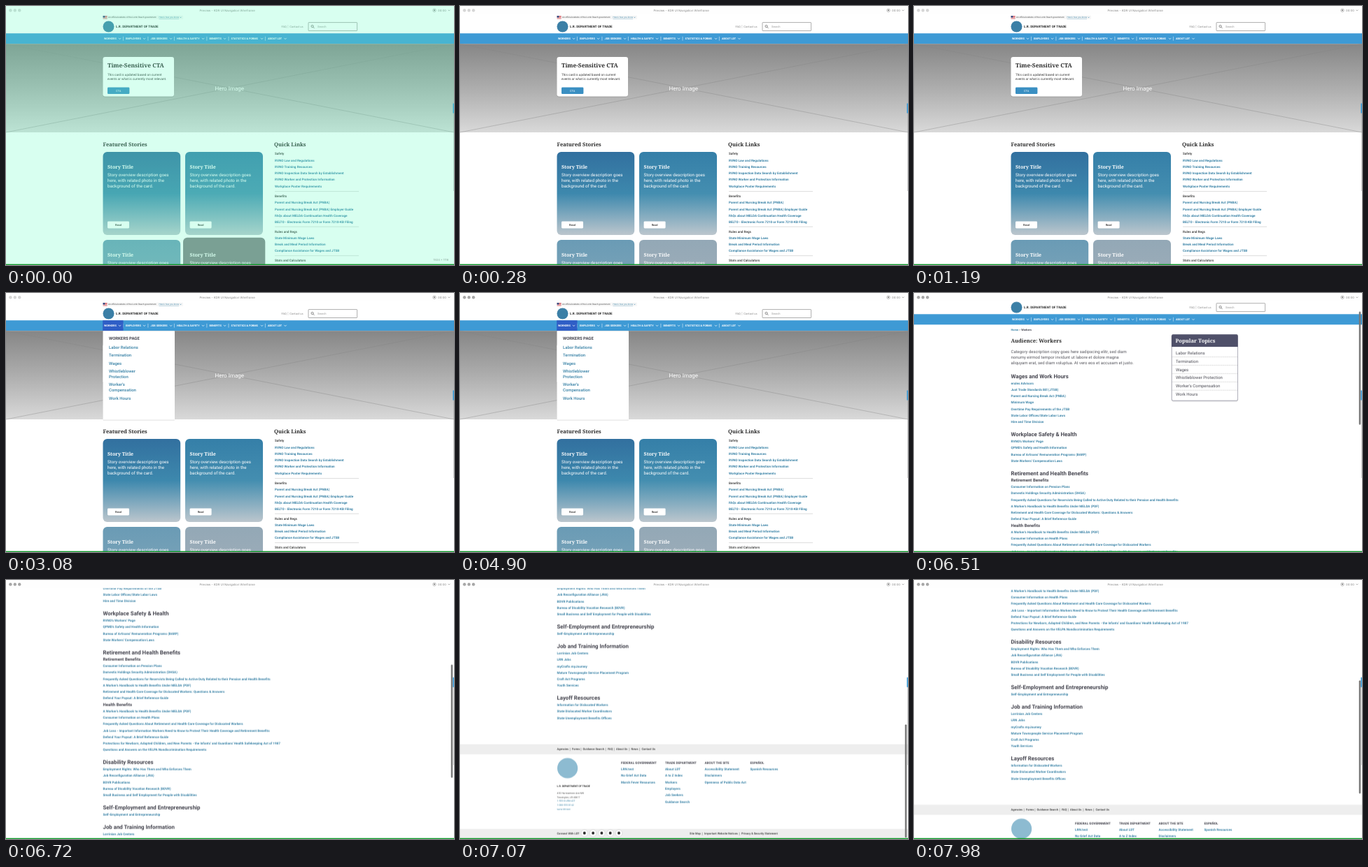
These frames come from a looping animation (640 by 371 pixels, 8000 ms). An HTML page:

```html
<!DOCTYPE html>
<html lang="en">
<head>
<meta charset="utf-8">
<title>Navigation wireframe</title>
<style>
html, body { margin: 0; width: 100%; height: 100%; overflow: hidden; background: #fff; }
svg { display: block; width: 100vw; height: 100vh; }
text { font-family: Roboto, "Liberation Sans", sans-serif; text-rendering: geometricPrecision; white-space: pre; }
.serif { font-family: "Noto Serif", "Liberation Serif", serif; font-weight: 700; }
.ui { font-family: Inter, "Liberation Sans", sans-serif; }
.menu, .page, .scroll, .thumb, .fade, .focus { animation: 8s linear infinite; }
.menu { animation-name: menu; animation-timing-function: step-end; }
.page { animation-name: page; animation-timing-function: step-end; }
.focus { animation-name: focus; animation-timing-function: step-end; }
.scroll { animation-name: scroll; }
.thumb { animation-name: thumb; }
.fade { animation-name: fade; }
@keyframes menu { 0% { opacity: 0 } 32.375% { opacity: 1 } 64.75%, 100% { opacity: 0 } }
@keyframes page { 0% { opacity: 0 } 64.75%, 100% { opacity: 1 } }
@keyframes focus { 0% { fill: #d6d6d6 } 45.5%, 100% { fill: #a8a8a8 } }
@keyframes fade { 0%, .86% { opacity: 1 } 3.5%, 100% { opacity: 0 } }
@keyframes scroll {
  0% { transform: translateY(0) }
  80.59% { transform: translateY(0); animation-timing-function: cubic-bezier(.333, 0, .667, .333) }
  84.48% { transform: translateY(-211.25px); animation-timing-function: cubic-bezier(.333, .667, .667, 1) }
  88.375% { transform: translateY(-422.5px) }
  96.975% { transform: translateY(-422.5px); animation-timing-function: cubic-bezier(.333, 0, .667, .333) }
  100% { transform: translateY(-320.3px) }
}
@keyframes thumb {
  0%, 79.87% { transform: translateY(12px); opacity: 0 }
  79.88% { transform: translateY(12px); opacity: 1; animation-timing-function: cubic-bezier(.333, 0, .667, .333) }
  83.77% { transform: translateY(109.5px); animation-timing-function: cubic-bezier(.333, .667, .667, 1) }
  87.66% { transform: translateY(207px) }
  96.26% { transform: translateY(207px); animation-timing-function: cubic-bezier(.333, 0, .667, .333) }
  100% { transform: translateY(135px); opacity: 1 }
}
</style>
</head>
<body>
<svg id="stage" viewBox="0 0 640 371" preserveAspectRatio="none"></svg>
<script>
const LINK = '#3982a6', DARK = '#333', HEAD = '#45454f', NAV = '#3e9ad5';

const esc = s => s.replace(/&/g, '&amp;').replace(/</g, '&lt;').replace(/>/g, '&gt;');
// y is the optical middle of the line
const text = (x, y, s, size, fill = DARK, weight = 400, attr = '') =>
  `<text x="${x}" y="${(y + size * .36).toFixed(2)}" font-size="${size}" fill="${fill}" font-weight="${weight}" ${attr}>${esc(s)}</text>`;
const serif = (x, y, s, size, fill = '#2b2b2b') => text(x, y, s, size, fill, 700, 'class="serif"');
const mid = 'text-anchor="middle"';
const rect = (x, y, w, h, fill, r = 0, attr = '') =>
  `<rect x="${x}" y="${y}" width="${w}" height="${h}" rx="${r}" fill="${fill}" ${attr}/>`;
const circle = (x, y, r, fill, attr = '') => `<circle cx="${x}" cy="${y}" r="${r}" fill="${fill}" ${attr}/>`;
const line = (x1, y1, x2, y2, stroke, w = .5, attr = '') =>
  `<path d="M${x1} ${y1}L${x2} ${y2}" stroke="${stroke}" stroke-width="${w}" fill="none" ${attr}/>`;
const chevron = (x, y, stroke, r = 1.7) =>
  `<path d="M${x - r} ${y - r / 2}l${r} ${r}l${r} ${-r}" stroke="${stroke}" stroke-width=".7" fill="none"/>`;
const rows = (x, list, draw) => list.map(([y, s]) => draw(x, y, s)).join('');
const link = (x, y, s) => text(x, y, s, 4.64, LINK, 700);
const gradient = (id, ...stops) =>
  `<linearGradient id="${id}" x2="0" y2="1">${stops.map((c, i) =>
    `<stop offset="${i / (stops.length - 1)}" stop-color="${c}"/>`).join('')}</linearGradient>`;

const defs = `<defs>
  ${gradient('hero', '#868686', '#adadad', '#d9d9d9')}
  ${gradient('card1', '#32709f', '#3d88ad', '#bcc6cd')}
  ${gradient('card2', '#357fa8', '#448eb0', '#bcc6cd')}
  ${gradient('card3', '#6a9bb5', '#7aa3b8', '#b4c4cc')}
  ${gradient('card4', '#93a8b6', '#9dadb9', '#b4c4cc')}
  <filter id="shadow" x="-10%" y="-10%" width="120%" height="125%">
    <feDropShadow dx="0" dy=".6" stdDeviation=".7" flood-opacity=".25"/></filter>
</defs>`;

function flag(x, y) {
  let s = rect(x, y, 6, 4.4, '#fff');
  for (let i = 0; i < 4; i++) s += rect(x, y + i * 1.2, 6, .7, '#d0454c');
  return s + rect(x, y, 2.7, 2.4, '#2b4c86');
}

function header() {
  const items = [[140, 'WORKERS', 162.6], [171, 'EMPLOYERS', 197.6], [206.5, 'JOB SEEKERS', 235.6],
    [244, 'HEALTH & SAFETY', 281.6], [290.5, 'BENEFITS', 312.6], [321.6, 'STATISTICS & FORMS', 365.6], [374, 'ABOUT LDT', 399]];
  return rect(138, 13.5, 115, 5.6, '#f7f7f7') + flag(138.6, 14.1) +
    text(146, 16.2, 'An official website of the Lorrin Reach government', 3.07, '#444') +
    text(218.5, 16.2, "Here's how you know", 3.07, LINK, 400, 'text-decoration="underline"') + chevron(249.5, 16.2, LINK, 1) +
    circle(146.5, 29.5, 8, '#3b7fa6') +
    text(157, 29.4, 'L.R. DEPARTMENT OF TRADE', 4.58, '#2b2b2b', 700) +
    text(393.5, 29.4, 'FAQ', 4.05, '#888') + line(402.8, 27, 402.8, 31.8, '#aaa', .4) +
    text(405.2, 29.4, 'Contact us', 4.05, '#888') +
    rect(432, 23.6, 69.6, 11.9, '#fff', .6, 'stroke="#777" stroke-width=".6"') +
    circle(437.6, 29, 1.6, 'none', 'stroke="#444" stroke-width=".6"') + line(438.8, 30.2, 440.4, 31.8, '#444', .7) +
    text(445, 29.5, 'Search', 4.1, '#999') +
    rect(0, 39.2, 640, 15, NAV) +
    items.map(([x, s, cx], i) => text(x, 46.7, s, 3.84, '#fff', 700) + chevron(cx, 46.7, '#fff') +
      (i ? line(x - 3.6, 43.8, x - 3.6, 49.6, '#fff', .5) : '')).join('');
}

function storyText(x, y) {
  const body = ['Story overview description goes', 'here, with related photo in the', 'background of the card.'];
  return serif(x, y, 'Story Title', 7, '#fff') +
    body.map((s, i) => text(x, y + 11.6 + i * 8, s, 6.2, '#fff')).join('');
}
const readButton = x => rect(x, 308.4, 31, 10, '#fff', 1.3) + text(x + 15.5, 313.5, 'Read', 3.95, DARK, 500, mid);

function quickLinks() {
  const groups = [
    [211.6, 'Safety', 'RVNO Law and Regulations', 'RVNO Training Resources', 'RVNO Inspection Data Search by Establishment',
      'RVNO Worker and Protection Information', 'Workplace Poster Requirements'],
    [272.3, 'Benefits', 'Parent and Nursing Break Act (PNBA)', 'Parent and Nursing Break Act (PNBA) Employer Guide',
      'FAQs about MELDA Continuation Health Coverage', 'BELTO - Electronic Form 7210 or Form 7210-KB Filing'],
    [322.9, 'Rules and Regs', 'State Minimum Wage Laws', 'Break and Meal Period Information', 'Compliance Assistance for Wages and JTSB'],
    [364.4, 'Stats and Calculators']];
  return serif(383, 198, 'Quick Links', 7.55) + groups.map(([y, title, ...links], i) =>
    (i ? line(384, y - 6.7, 504, y - 6.7, '#aaa', .4) : '') + text(384, y, title, 4.65, DARK, 500) +
    links.map((s, n) => link(384, y + 9.28 * (n + 1), s)).join('')).join('');
}

function home() {
  return header() + rect(0, 54.2, 640, 126.8, 'url(#hero)') +
    line(0, 54.2, 640, 181, '#838383', .4) + line(0, 181, 640, 54.2, '#838383', .4) +
    text(319.3, 117.6, 'Hero Image', 8.05, '#fff', 400, mid) +
    rect(138.5, 73, 101.5, 56.5, '#fff', 3.2, 'filter="url(#shadow)"') +
    serif(145, 85, 'Time-Sensitive CTA', 8.3) +
    text(145, 98, 'This card is updated based on current', 4.63) +
    text(145, 104.2, 'events or what is currently most relevant.', 4.63) +
    rect(145, 116.4, 31.4, 9.7, '#3a8fc2', 1.3) + text(160.7, 121.3, 'CTA', 3.95, '#fff', 400, mid) +
    serif(138.5, 198, 'Featured Stories', 7.57) +
    rect(138.5, 209, 110.7, 119, 'url(#card1)', 6) + rect(256, 209, 111, 119, 'url(#card2)', 6) +
    rect(138.5, 335, 110.7, 119, 'url(#card3)', 6) + rect(256, 335, 111, 119, 'url(#card4)', 6) +
    `<g class="fade">${rect(253, 331.8, 117.3, 125, '#818084', 6)}</g>` +
    storyText(145, 230) + storyText(262.6, 230) + storyText(145, 356) + storyText(262.6, 356) +
    readButton(145) + readButton(262.6) + quickLinks();
}

function menu() {
  const items = [[78, 'Labor Relations'], [89.2, 'Termination'], [100.6, 'Wages'], [112, 'Whistleblower'], [120, 'Protection'],
    [131.2, "Worker's"], [139.2, 'Compensation'], [150.5, 'Work Hours']];
  return rect(138.2, 39.2, 29.3, 15, '#2f5ec6') + text(140, 46.7, 'WORKERS', 3.84, '#fff', 700) + chevron(162.6, 46.7, '#fff') +
    rect(138.5, 54.2, 102.5, 127.2, '#fff', .5, 'filter="url(#shadow)"') +
    text(147, 65, 'WORKERS PAGE', 5.95, HEAD, 700) + rows(147, items, (x, y, s) => text(x, y, s, 5.97, LINK, 500));
}

// A leading "*" marks a bold subheading.
const sections = [
  ['Wages and Work Hours', 'erules Advisors', 'Just Trade Standards Bill (JTSB)', 'Parent and Nursing Break Act (PNBA)', 'Minimum Wage',
    'Overtime Pay Requirements of the JTSB', 'State Labor Offices/State Labor Laws', 'Hire and Time Division'],
  ['Workplace Safety & Health', "RVNO's Workers' Page", "QPMD's Safety and Health Information",
    "Bureau of Artisans' Remuneration Programs (BARP)", "State Workers' Compensation Laws"],
  ['Retirement and Health Benefits', '*Retirement Benefits', 'Consumer Information on Pension Plans',
    'Domestic Holdings Security Administration (DHSA)',
    'Frequently Asked Questions for Reservists Being Called to Active Duty Related to their Pension and Health Benefits',
    "A Worker's Handbook to Health Benefits Under MELDA (PDF)",
    'Retirement and Health Care Coverage for Dislocated Workers: Questions & Answers',
    'Defend Your Payout: A Brief Reference Guide', '*Health Benefits',
    "A Worker's Handbook to Health Benefits Under MELDA (PDF)", 'Consumer Information on Health Plans',
    'Frequently Asked Questions About Retirement and Health Care Coverage for Dislocated Workers',
    'Job Loss - Important Information Workers Need to Know to Protect Their Health Coverage and Retirement Benefits',
    'Defend Your Payout: A Brief Reference Guide',
    "Protections for Newborn, Adopted Children, and New Parents - the Infants' and Guardians' Health Safekeeping Act of 1987",
    'Questions and Answers on the VELPA Nondiscrimination Requirements'],
  ['Disability Resources', 'Employment Rights: Who Has Them and Who Enforces Them', 'Job Reconfiguration Alliance (JRA)',
    'BDVR Publications', 'Bureau of Disability Vocation Research (BDVR)',
    'Small Business and Self Employment for People with Disabilities'],
  ['Self-Employment and Entrepreneurship', 'Self-Employment and Entrepreneurship'],
  ['Job and Training Information', 'Lorrinian Job Centers', 'LRN Jobs', 'myCrafts myJourney',
    'Mature Townspeople Service Placement Program', 'Craft Act Programs', 'Youth Services'],
  ['Layoff Resources', 'Information for Dislocated Workers', 'State Dislocated Worker Coordinators', 'State Unemployment Benefits Offices']];

function sectionList() {
  let y = 119.3, out = '';
  for (const [title, ...links] of sections) {
    out += text(138.5, y, title, 7.87, HEAD, 700);
    y += 10.2;
    for (const s of links) {
      out += s[0] === '*' ? text(138.5, y, s.slice(1), 6, HEAD, 700) : link(138.5, y, s);
      y += 9.26;
    }
    y += 8.4;
  }
  return out;
}

function topics() {
  const names = ['Labor Relations', 'Termination', 'Wages', 'Whistleblower Protection', "Worker's Compensation", 'Work Hours'];
  return rect(368.2, 60, 94.4, 94.6, '#fff', 2, 'filter="url(#shadow)" stroke="#77778c" stroke-width=".6"') +
    `<path d="M368 77.4V62q0-2.3 2.3-2.3h90.1q2.3 0 2.3 2.3v15.4z" fill="#4f5069"/>` +
    serif(373.5, 68.6, 'Popular Topics', 7.55, '#fff') +
    names.map((s, i) => text(374, 86 + i * 11.94, s, 6, '#4c4c55') +
      (i ? line(368.5, 80 + i * 11.94, 462.3, 80 + i * 11.94, '#999', .4, 'stroke-dasharray="1 .6"') : '')).join('');
}

// y = 0 here is the footer's own top edge
function footer() {
  const bar = (y, list) => list.map(([x, s], i) => text(x, y, s, 4, DARK, 500) +
    (i ? line(x - 2.8, y - 2, x - 2.8, y + 2.2, '#555', .4) : '')).join('');
  const columns = [
    [230, 'FEDERAL GOVERNMENT', 'LRN.test', 'No Grief Act Data', 'Marsh Fever Resources'],
    [293, 'TRADE DEPARTMENT', 'About LDT', 'A to Z Index', 'Workers', 'Employers', 'Job Seekers', 'Guidance Search'],
    [349.5, 'ABOUT THE SITE', 'Accessibility Statement', 'Disclaimers', 'Openness of Public Data Act'],
    [414.5, 'ESPAÑOL', 'Spanish Resources']];
  const address = ['410 Harrowmere Ave NW', 'Tessington, LR 40417', '1-555-0-LRN-LDT', '1-000-555-0142', 'www.ldt.test'];
  return rect(0, 0, 640, 14.5, '#eeeeee') +
    bar(7.3, [[138.5, 'Agencies'], [160, 'Forms'], [175.6, 'Guidance Search'], [211, 'FAQ'], [223, 'About Us'], [244.6, 'News'], [259.4, 'Contact Us']]) +
    circle(153.6, 34.3, 14.6, '#8dbbd1') + text(138.5, 60.3, 'L.R. DEPARTMENT OF TRADE', 3.57, '#2b2b2b', 700) +
    address.map((s, i) => text(138.5, 70.2 + i * 5.67, s, 3.45, i > 1 ? LINK : '#444')).join('') +
    columns.map(([x, title, ...links]) => text(x, 26.4, title, 4.58, HEAD, 700) +
      links.map((s, i) => link(x, 35.7 + i * 9.3, s)).join('')).join('') +
    rect(0, 121.3, 640, 16, '#eeeeee') + text(138.5, 128.3, 'Connect With LDT', 4, DARK, 500) +
    [177.8, 190.1, 202.4, 214.7, 227].map(x => circle(x, 127.4, 4.9, '#fff', 'stroke="#bbb" stroke-width=".4"') + circle(x, 127.4, 2, '#222')).join('') +
    bar(128.3, [[328, 'Site Map'], [349, 'Important Website Notices'], [402, 'Privacy & Security Statement']]);
}

function workersPage() {
  const intro = [[84.6, 'Category description copy goes here sadipscing elitr, sed diam'],
    [92.6, 'nonumy eirmod tempor invidunt ut labore et dolore magna'],
    [100.6, 'aliquyam erat, sed diam voluptua. At vero eos et accusam et justo.']];
  return header() + `<g transform="translate(0 8.5)">` +
    text(138.5, 53, 'Home', 4, LINK, 700) + text(150, 53, '>', 4, '#666') + text(153.2, 53, 'Workers', 4, HEAD, 700) +
    serif(138.5, 68.6, 'Audience: Workers', 7.5) + rows(138.5, intro, (x, y, s) => text(x, y, s, 5.97, '#55555c')) +
    topics() + sectionList() + `<g transform="translate(0 649.2)">${footer()}</g></g>`;
}

function titleBar() {
  const dots = [6.4, 12.8, 19.2].map(x => circle(x, 6.2, 2.2, 'inherit')).join('');
  return rect(0, 0, 640, 11.6, '#fefefe') + `<g class="focus">${dots}</g>` +
    text(316, 6.2, 'Preview - KDR UI Navigation Wireframe', 4.25, '#888', 400, `class="ui" ${mid}`) +
    circle(612, 6.2, 2.3, 'none', 'stroke="#888" stroke-width=".5"') + circle(612, 6.2, 1.1, '#888') +
    text(617, 6.2, '00:00', 4.25, '#888', 400, 'class="ui"') + chevron(633, 6.2, '#888', 1.3);
}

document.getElementById('stage').innerHTML = defs + rect(0, 0, 640, 371, '#fff') + home() +
  `<g class="menu">${menu()}</g>` +
  `<g class="page">${rect(0, 0, 640, 371, '#fff')}<g class="scroll">${workersPage()}</g></g>` +
  titleBar() + line(639.6, 153, 639.6, 265, '#aaa', .6) +
  `<g class="thumb">${rect(635.7, 0, 2.5, 162, '#787878', 1.2)}</g>` +
  rect(638.4, 139.5, 1.6, 14, '#3a9bd8') +
  `<g class="fade">${rect(0, 0, 640, 371, 'rgba(99,255,195,.25)')}${text(610.5, 363.4, '1924 × 1116', 4.1, '#8ba79c', 400, 'class="ui"')}</g>` +
  rect(0, 369.7, 640, 1.3, '#0f9a2a');
</script>
</body>
</html>
```
